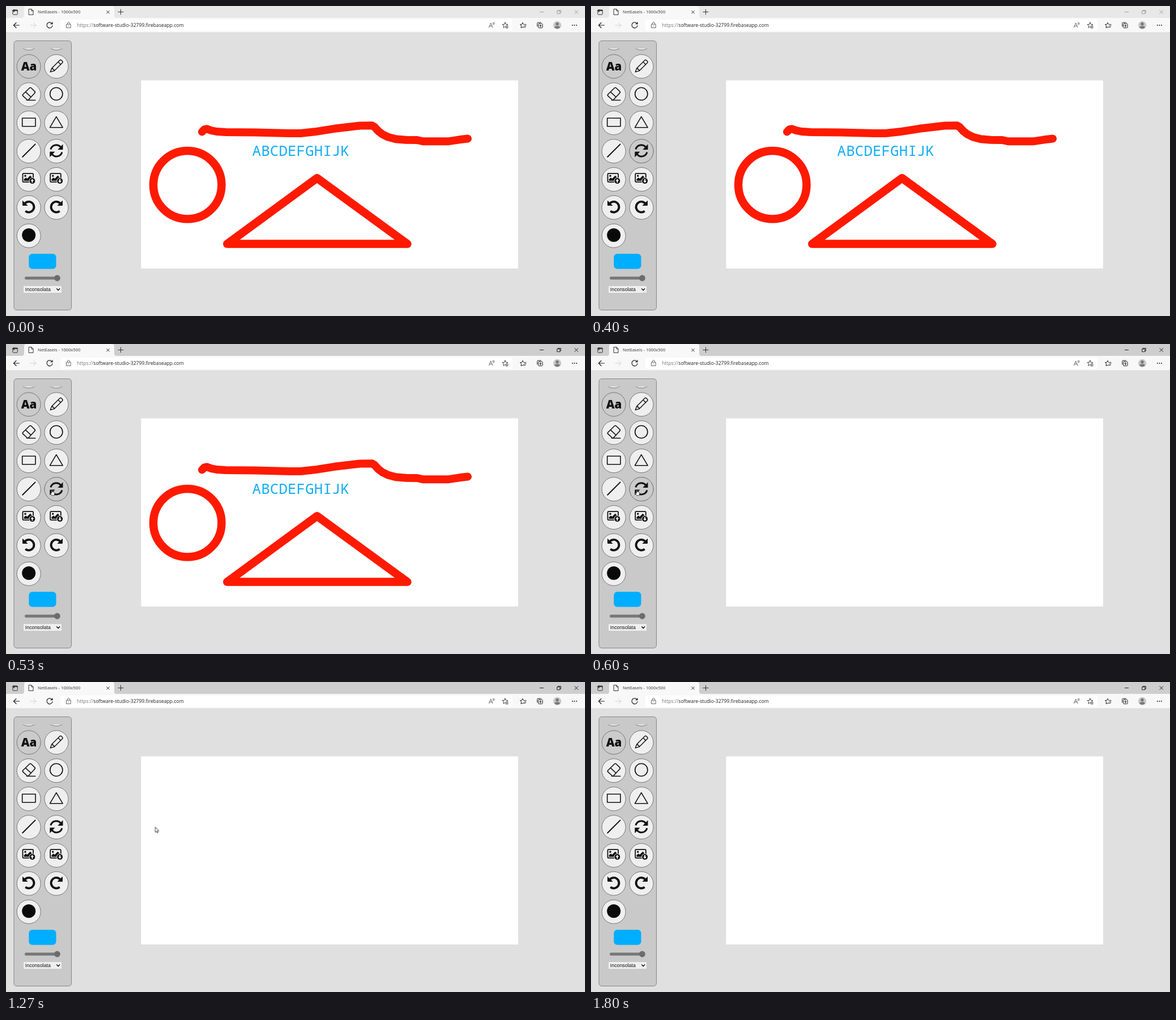
These frames come from a looping animation (1022x548 px, 1.99 s). An HTML page:

```html
<!DOCTYPE html>
<html lang="en">
<head>
<meta charset="utf-8">
<title>Drawing app</title>
<style>
  html, body { margin: 0; width: 100%; height: 100%; overflow: hidden; background: #e0e0e0; }
  svg { display: block; width: 100vw; height: 100vh; }
  text { white-space: pre; }
  .ui { font-family: "Open Sans", "Noto Sans", sans-serif; }
  .line { fill: none; stroke: #111; stroke-width: 1.6; stroke-linejoin: round; stroke-linecap: round; }
  .thin { fill: none; stroke: #333; stroke-width: 1; stroke-linejoin: round; stroke-linecap: round; }
  .paint { fill: none; stroke: #ff1a00; stroke-width: 14.5; stroke-linejoin: round; stroke-linecap: round; }
  .btn { fill: #efefef; stroke: #777; stroke-width: 1; }
  .on { fill: #cbcbcb; }

  .bar, .win, .hover, .art, .hand, .arrow { animation: 1990ms step-end infinite; }
  .bar { animation-name: bar; }
  .win { animation-name: win; fill: none; stroke-width: 1; }
  .hover { animation-name: hover; }
  .art { animation-name: art; }
  .hand { animation-name: hand; }
  .arrow { animation-name: arrow; }

  @keyframes bar { 0% { fill: #e8e8e8; } 26.63%, 100% { fill: #cecece; } }
  @keyframes win { 0% { stroke: #a0a0a0; } 26.63%, 100% { stroke: #222; } }
  @keyframes hover { 0% { opacity: 0; } 20.1% { opacity: 1; } 60.3%, 100% { opacity: 0; } }
  @keyframes art { 0% { opacity: 1; } 30.15%, 100% { opacity: 0; } }
  @keyframes hand { 0% { opacity: 0; } 26.63% { opacity: 1; } 56.78%, 100% { opacity: 0; } }
  @keyframes arrow {
    0% { opacity: 0; transform: translate(104px, 257px); }
    56.78% { opacity: 1; transform: translate(104px, 257px); }
    60.3% { opacity: 1; transform: translate(170px, 257px); }
    63.81% { opacity: 1; transform: translate(263.5px, 256.5px); }
    66.83% { opacity: 1; transform: translate(330px, 254px); }
    70.35%, 100% { opacity: 0; transform: translate(330px, 254px); }
  }
</style>
</head>
<body>
<svg viewBox="0 0 1022 548" preserveAspectRatio="none">
  <defs>
    <clipPath id="scroll"><rect x="14" y="75.3" width="102" height="20"/></clipPath>
    <g id="half">
      <path d="M-10 -2.5A10.2 10.2 0 0 1 7.6 -6.5" fill="none" stroke="#111" stroke-width="3"/>
      <path d="M11.6 -11.5V-2.6Q11.6 -1.8 10.8 -1.8H2.4Z" fill="#111"/>
    </g>
    <g id="turn">
      <path d="M-8 -5.3A9.3 9.3 0 1 1 -6.2 7.2" fill="none" stroke="#111" stroke-width="3.8"/>
      <path d="M-11.5 -11.6V-3.2Q-11.5 -2.2 -10.5 -2.2H-1.8Z" fill="#111"/>
    </g>
    <g id="photo">
      <rect x="-10.2" y="-8.7" width="18.6" height="15" rx="1.3" fill="none" stroke="#111" stroke-width="1.8"/>
      <circle cx="-5.7" cy="-4.6" r="1.7" fill="#111"/>
      <path d="M-8 4.2V1.4L-4.6 -1.5L-2.4 .5L3 -5L6.5 -1.5V4.2Z" fill="#111"/>
      <circle cx="6.7" cy="4.3" r="5.5" fill="#111" stroke="#efefef" stroke-width="1"/>
    </g>
    <path id="up" d="M0 -3.4L3 -.1H1V3.1H-1V-.1H-3Z" fill="#fff"/>
    <path id="star" d="M0 -5L1.4 -1.7L5 -1.4L2.3 .9L3.1 4.4L0 2.5L-3.1 4.4L-2.3 .9L-5 -1.4L-1.4 -1.7Z"/>
  </defs>

  <!-- browser frame -->
  <rect width="1022" height="548" fill="#e0e0e0"/>
  <rect class="bar" width="1022" height="22"/>
  <path d="M0 47V21H28Q32 21 32 17V4Q32 0 36 0H187Q191 0 191 4V17Q191 21 195 21H1022V47Z" fill="#f8f8f8"/>
  <rect y="46.6" width="1022" height=".8" fill="#d5d5d5"/>
  <rect x="96" y="24" width="798" height="20" rx="2.5" fill="#fff"/>
  <rect x="11.9" y="6.8" width="8.4" height="8.4" rx="1.4" class="thin" stroke-width="1.2"/>
  <path d="M12 8.2H20.2M14 7V10" class="thin" style="stroke-width:1.8"/>
  <path d="M40.5 5.5H45L48 8.7V15.5H40.5ZM45 5.5V8.7H48" class="thin"/>
  <text class="ui" x="56" y="13.4" font-size="7.6" fill="#333">NetEasels - 1000x500</text>
  <path d="M177.6 8.4L182.4 13.2M182.4 8.4L177.6 13.2M198 10.5H207M202.5 6V15" class="thin"/>
  <g class="win">
    <path d="M942 10.5H949M1003.5 7.3L1010 13.8M1010 7.3L1003.5 13.8"/>
    <path d="M974 8.8V7.5H979.3V12.2H978M972.7 8.9H977.8V13.7H972.7Z"/>
  </g>
  <path d="M23.5 34H13.5M18 29.5L13.5 34L18 38.5" class="thin" style="stroke:#222;stroke-width:1.2"/>
  <path d="M43 34H53M48.5 29.5L53 34L48.5 38.5" class="thin" style="stroke:#d0d0d0"/>
  <path d="M81.3 31.2A5 5 0 1 0 82 34.5M82 28.8V31.7H79" class="thin" style="stroke:#222;stroke-width:1.2"/>
  <path d="M106.8 32.2H114.2V38.5H106.8ZM108.5 32V30.8Q108.5 28.7 110.5 28.7Q112.5 28.7 112.5 30.8V32M110.5 35V35.6" class="thin" style="stroke:#666"/>
  <text class="ui" x="125" y="37.2" font-size="8.6" fill="#777">https://<tspan fill="#222">software-studio-32799.firebaseapp.com</tspan></text>
  <path d="M852.5 38L855.7 30L859 38M853.7 35.3H857.8M859.5 29.5Q860.7 31 859.5 32.5M861.2 28.8Q862.8 31 861.2 33" class="thin" style="stroke:#555;stroke-width:.9"/>
  <g class="thin" style="stroke:#444">
    <use href="#star" x="881" y="34"/>
    <circle cx="884" cy="37" r="2.9" fill="#555" stroke="#fff" stroke-width=".6"/>
    <path d="M882.6 37H885.4M884 35.6V38.4" stroke="#fff" stroke-width=".8"/>
  </g>
  <g class="thin" style="stroke:#222">
    <path d="M914.8 32.6H918M915.2 35H918M913.5 37.3H917"/>
    <path d="M913 37.2L909 38.5L909.6 35L907.5 32.7L910.7 32.3L912 29.3L913.5 32.3"/>
    <rect x="939.6" y="31.2" width="7.5" height="7.5" rx="1.4"/>
    <path d="M937.7 36V30.5Q937.7 29.2 939 29.2H944.5M941.5 35H945.2M943.4 33.1V36.9"/>
  </g>
  <circle cx="973" cy="34" r="7.2" fill="#c8c8c8"/>
  <circle cx="973" cy="31.7" r="2.7" fill="#777"/>
  <path d="M968.5 38.6Q968.5 35.4 971 35.4H975Q977.5 35.4 977.5 38.6Q973 41.2 968.5 38.6Z" fill="#777"/>
  <g fill="#222"><circle cx="999.8" cy="34" r="1"/><circle cx="1003.4" cy="34" r="1"/><circle cx="1007" cy="34" r="1"/></g>

  <!-- tool panel -->
  <rect x="14" y="61.5" width="101.5" height="476" rx="5" fill="#c9c9c9" stroke="#858585"/>
  <g class="btn" clip-path="url(#scroll)">
    <circle cx="40.2" cy="56.8" r="21"/><circle cx="89" cy="56.8" r="21"/>
  </g>
  <g class="btn">
    <circle class="on" cx="40.2" cy="106.8" r="21"/><circle cx="89" cy="106.8" r="21"/>
    <circle cx="40.2" cy="156.7" r="21"/><circle cx="89" cy="156.7" r="21"/>
    <circle cx="40.2" cy="206.6" r="21"/><circle cx="89" cy="206.6" r="21"/>
    <circle cx="40.2" cy="256.6" r="21"/><circle cx="89" cy="256.6" r="21"/>
    <circle cx="40.2" cy="306.5" r="21"/><circle cx="89" cy="306.5" r="21"/>
    <circle cx="40.2" cy="356.2" r="21"/><circle cx="89" cy="356.2" r="21"/>
    <circle cx="40.2" cy="406.2" r="21"/>
    <circle class="on hover" cx="89" cy="256.6" r="21"/>
  </g>
  <text class="ui" x="40.5" y="113.6" font-size="20.5" font-weight="800" text-anchor="middle" fill="#111">Aa</text>
  <g class="line">
    <path d="M78.3 116.7L80.6 110.2L94.8 96Q96.3 94.6 97.8 96L99.4 97.6Q100.8 99.1 99.4 100.5L85.1 114.7ZM92 98.8L96.6 103.4M80.6 110.2L82.8 110.5L83 112.4L84.8 112.6L85.1 114.7" stroke-width="1.4"/>
    <path d="M37.6 166L30.1 159.2Q28.6 157.6 30.1 156L41.4 145Q43 143.5 44.6 145L50.6 150.8Q52.1 152.4 50.6 154L39.4 166M34.4 151.8L44.2 161M36.5 166.5H51.8"/>
    <circle cx="88.8" cy="155.4" r="11.1"/>
    <rect x="28.7" y="198.2" width="23.3" height="14.6"/>
    <path d="M88.8 195.6L100.2 214.8H77.4Z"/>
    <path d="M29.2 266.8L51.6 244.4" stroke-width="2"/>
  </g>
  <g transform="translate(88.9 255.8)"><use href="#half"/><use href="#half" transform="rotate(180)"/></g>
  <use href="#photo" x="39.7" y="304.8"/><use href="#up" x="46.4" y="309.1"/>
  <use href="#photo" x="88.4" y="304.8"/><use href="#up" transform="translate(95.1 309.1) rotate(180)"/>
  <use href="#turn" x="40.5" y="355.3"/>
  <use href="#turn" transform="translate(88.5 355.3) scale(-1 1)"/>
  <circle cx="40.2" cy="405" r="12" fill="#0a0a0a"/>
  <rect x="40.3" y="438" width="48.2" height="26.8" rx="6" fill="#00aeff"/>
  <rect x="33" y="478.5" width="62.5" height="5" rx="2.5" fill="#b8b8b8"/>
  <rect x="33" y="478.5" width="58" height="5" rx="2.5" fill="#777"/>
  <circle cx="90.4" cy="481" r="5.4" fill="#6c6c6c"/>
  <rect x="31" y="495" width="67" height="12" rx="1" fill="#efefef"/>
  <text x="33.8" y="504.2" font-size="8.8" font-family="'Liberation Sans', Arial, sans-serif" fill="#111">Inconsolata</text>
  <path d="M89.6 499.8L92.2 502.4L94.8 499.8" class="thin" style="stroke:#111;stroke-width:1.4"/>

  <!-- canvas -->
  <rect x="238.5" y="131.5" width="665.5" height="332.5" fill="#fff"/>
  <g class="art">
    <path class="paint" style="stroke-width:14" d="M346 222.5L350 218.3L354.5 217.2L362 220L372 222L388 222.9L440 223.6L500 225H520L545 222.3L580 216.8L612 213L625 211.5L646 211.2L651 214.3L657 221L664 226.5L674 231.5L688 235.3L706 236.8L726 237L736 239.3H780L800 236.3L815 234.5"/>
    <circle class="paint" cx="320.3" cy="316.3" r="60.2"/>
    <path class="paint" d="M549 304.2L390.3 420.6H708.5Z"/>
    <text x="434.6" y="264.8" font-size="26" font-family="'Noto Sans Mono', 'DejaVu Sans Mono', monospace" fill="#14aef5">ABCDEFGHIJK</text>
  </g>

  <!-- pointers -->
  <path class="hand" d="M80.3 262.5V258.8Q81 257.6 81.8 258.8V261.2L85 261.9Q86 262.3 85.8 263.6L85 267.8H81L78.5 264.3Q78.6 263 80.3 264Z" fill="#fff" stroke="#222" stroke-width=".8"/>
  <path class="arrow" d="M0 0V9.2L2.1 7.4L3.5 10.3L5 9.6L3.7 6.8H6.4Z" fill="#fff" stroke="#222" stroke-width=".9"/>
</svg>
</body>
</html>
```
